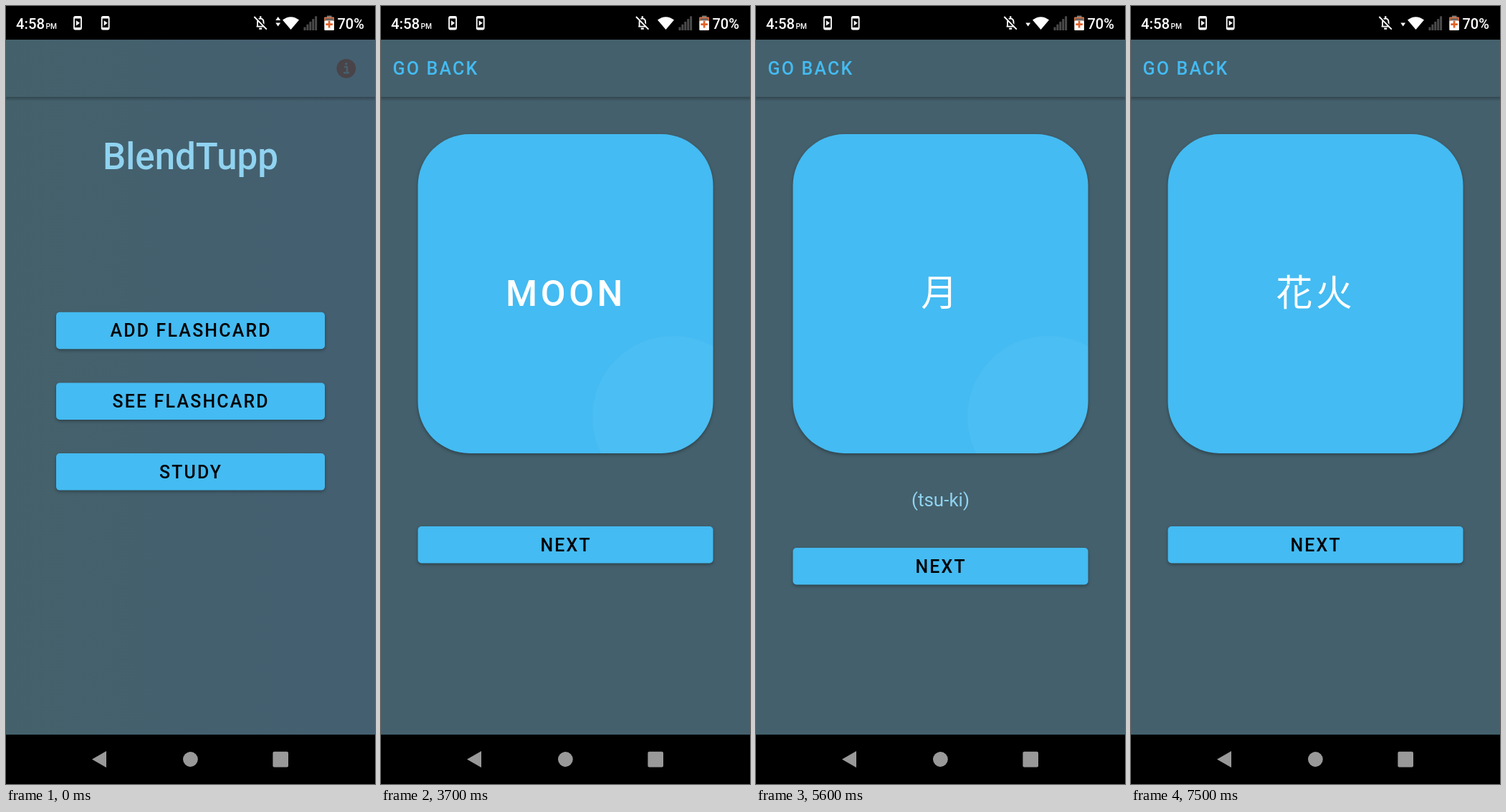
These frames come from a looping animation (515x1087 px, 8 s). An HTML page:

```html
<!DOCTYPE html>
<html lang="en">
<head>
<meta charset="utf-8">
<title>Flashcards</title>
<style>
  html, body { margin: 0; width: 100%; height: 100%; overflow: hidden; background: #000; }
  svg { display: block; width: 100vw; height: 100vh; }
  text { font-family: Roboto, "Noto Sans CJK JP", "Noto Sans CJK", sans-serif; font-weight: 500; white-space: pre; }
  .label { font-size: 24.9px; letter-spacing: 2.2px; }
  .mid { text-anchor: middle; }
  .word { font-size: 50.5px; letter-spacing: 4.5px; fill: #fff; }
  .kanji { font-family: "Noto Sans CJK JP", "Noto Sans CJK", sans-serif; font-size: 51px; font-weight: 400; }
  .raised { fill: #44bbf2; filter: drop-shadow(0 2px 2px rgba(0, 0, 0, .32)); }
  .bar text { fill: #fff; }
</style>
</head>
<body>
<svg viewBox="0 0 515 1087" preserveAspectRatio="none">
  <defs>
    <linearGradient id="homeBg">
      <stop offset="0" stop-color="#44616b"/>
      <stop offset=".45" stop-color="#44606e"/>
      <stop offset="1" stop-color="#445f70"/>
    </linearGradient>
    <linearGradient id="fall" x2="0" y2="1">
      <stop offset="0" stop-color="#000" stop-opacity=".27"/>
      <stop offset="1" stop-color="#000" stop-opacity="0"/>
    </linearGradient>
    <clipPath id="app"><rect y="47" width="515" height="971"/></clipPath>
    <clipPath id="studyClip"><rect x="70" y="625" width="375" height="51.5" rx="5"/></clipPath>
    <clipPath id="cardClip"><rect x="51.5" y="179" width="412" height="446" rx="72"/></clipPath>
    <clipPath id="nextClip"><rect x="51.5" y="727" width="412" height="51.5" rx="5"/></clipPath>
    <g id="castIcon">
      <rect x="1" y="1" width="10" height="17.5" rx="1.5" fill="none" stroke="#fff" stroke-width="1.8"/>
      <path d="M1 2.2H11M1 17.2H11" stroke="#fff" stroke-width="2.4"/>
      <path d="M4 6.2L9 9.8L4 13.4Z" fill="#fff"/>
    </g>
  </defs>
  <rect width="515" height="1087"/>

  <g clip-path="url(#app)">
    <g id="home">
      <rect y="47" width="515" height="971" fill="url(#homeBg)"/>
      <rect y="127" width="515" height="6" fill="url(#fall)"/>
      <circle cx="474.8" cy="87.3" r="13.4" fill="#494449"/>
      <path d="M472 85H476V93M471 93.3H479" fill="none" stroke="#46606c" stroke-width="2.4"/>
      <circle cx="474.8" cy="80.8" r="1.7" fill="#46606c"/>
      <text class="mid" x="257.5" y="227.5" font-size="51" fill="#90d3f0">BlendTupp</text>
      <g id="menu"></g>
      <circle id="studyRipple" clip-path="url(#studyClip)" cx="327" cy="651" fill="#000"/>
    </g>

    <g id="study">
      <rect y="47" width="515" height="971" fill="#44606c"/>
      <rect y="127" width="515" height="6" fill="url(#fall)"/>
      <text class="label" x="16.6" y="95.8" fill="#44bbf2">GO BACK</text>
      <rect class="raised" x="51.5" y="179" width="412" height="446" rx="72"/>
      <circle id="cardRipple" clip-path="url(#cardClip)" cx="408" cy="574" fill="#fff"/>
      <text id="word" x="258" y="419.3" lang="ja"></text>
      <text id="reading" class="mid" x="257.5" y="699" font-size="26" style="font-weight:400" fill="#90d3f0">(tsu-ki)</text>
      <g id="next">
        <rect class="raised" x="51.5" y="727" width="412" height="51.5" rx="5"/>
        <circle id="nextRipple" clip-path="url(#nextClip)" cx="290" cy="753" fill="#000"/>
        <text class="label mid" x="258.1" y="761.6">NEXT</text>
      </g>
    </g>
  </g>

  <g class="bar">
    <text x="14" y="31.5" font-size="20.3">4:58</text>
    <text x="55.5" y="31.5" font-size="10.2">PM</text>
    <text x="462.5" y="31.5" font-size="20">70%</text>
    <use href="#castIcon" x="94" y="14"/>
    <use href="#castIcon" x="132.7" y="14"/>
    <g id="bell" fill="none" stroke="#fff" stroke-width="1.9">
      <path d="M349.6 28.6H361.5M351 28V22.5Q351 17.6 355.2 17.6Q359.5 17.6 359.5 22.5V28"/>
      <path d="M355.2 14.2V17.5M353.2 31.6H357.2" stroke-width="2.4"/>
      <path d="M347.8 14.4L365.4 32" stroke="#000"/>
      <path d="M346.4 15L363.8 32.6"/>
    </g>
    <path id="up" d="M376.3 20L379.7 15L383.1 20Z" fill="#fff"/>
    <path id="down" d="M376.3 23.5H383.1L379.7 28.5Z" fill="#fff"/>
    <path d="M397.5 33L386 19.5Q397.5 11 409 19.5Z" fill="#fff"/>
    <g id="signal" fill="#4a4a4a"></g>
    <rect x="448" y="13.5" width="6.5" height="4" fill="#777"/>
    <rect x="444.3" y="15.8" width="13.6" height="18.2" rx="1" fill="#fff"/>
    <rect x="444.3" y="15.8" width="13.6" height="4.6" fill="#6c6562"/>
    <path d="M445 21V16.5H457.2V21" fill="none" stroke="#dc6731" stroke-width="1.4"/>
    <path d="M451.1 20.8V30.4M446.3 25.6H455.9" stroke="#e0622a" stroke-width="2.7"/>
  </g>

  <g fill="#999">
    <path d="M120 1052.5L140 1041V1064Z"/>
    <circle cx="257.4" cy="1052.5" r="10.4"/>
    <rect x="372.4" y="1041.8" width="21.6" height="21.6" rx="2"/>
  </g>
</svg>
<script>
const LOOP = 8000, STEP = 100;
const el = id => document.getElementById(id);
const set = (id, attrs) => {
  for (const k in attrs) el(id).setAttribute(k, attrs[k]);
};
const show = (id, on) => set(id, { visibility: on ? 'visible' : 'hidden' });
const clamp = v => Math.max(0, Math.min(1, v));

el('menu').innerHTML = ['ADD FLASHCARD', 'SEE FLASHCARD', 'STUDY'].map((label, i) => {
  const y = 427.7 + i * 98.7;
  return `<rect class="raised" x="70" y="${y}" width="375" height="51.5" rx="5"/>
    <text class="label mid" x="258.1" y="${y + 34.5}">${label}</text>`;
}).join('');

el('signal').innerHTML = [0, 1, 2, 3, 4].map(i =>
  `<rect x="${415.5 + i * 3.9}" y="${29.5 - i * 3.8}" width="3" height="${4.5 + i * 3.8}"/>`).join('');

// Grows, holds, then fades over the last two steps.
function ripple(id, age, life, r0, speed, a0, peak) {
  const on = age >= 0 && age < life;
  const rise = a0 + (peak - a0) * clamp(age / 200);
  set(id, {
    r: on ? r0 + age * speed : 0,
    opacity: on ? rise * clamp((life - age) / 200) : 0
  });
}

function setWord(text) {
  const word = el('word');
  if (word.textContent === text) return;
  word.textContent = text;
  word.setAttribute('class', text === 'MOON' ? 'word mid' : 'word mid kanji');
}

function draw(time) {
  const t = Math.floor((time % LOOP) / STEP) * STEP;
  const within = (a, b) => t >= a && t < b;

  const entering = within(1600, 1700);
  show('home', t < 1700);
  show('study', t >= 1600);
  set('study', {
    opacity: entering ? .52 : 1,
    transform: `translate(0 ${entering ? 30 : 0})`
  });

  set('studyRipple', {
    r: t < 1300 ? 0 : t < 1400 ? 75 : t < 1600 ? 120 : 141,
    opacity: t < 1400 ? .08 : .14
  });
  if (t < 5000) ripple('cardRipple', t - 3700, 500, 113, 1.3, .04, .13);
  else ripple('cardRipple', t - 5600, 500, 113, 1.7, .04, .13);
  ripple('nextRipple', t - 7000, 500, 80, .9, .06, .14);

  setWord(within(3700, 5600) ? 'MOON' : t < 6900 ? '月' : '花火');
  const hint = within(3800, 5700);
  show('reading', hint);
  set('next', { transform: `translate(0 ${hint ? 30 : 0})` });

  const both = t < 900;
  const down = within(5400, 6400) || t >= 7200;
  show('up', both);
  show('down', both || down);
  set('bell', { transform: `translate(${both || down ? 0 : 9.6} 0)` });
}

const start = performance.now();
function tick() {
  draw(performance.now() - start);
  requestAnimationFrame(tick);
}
tick();
</script>
</body>
</html>
```
